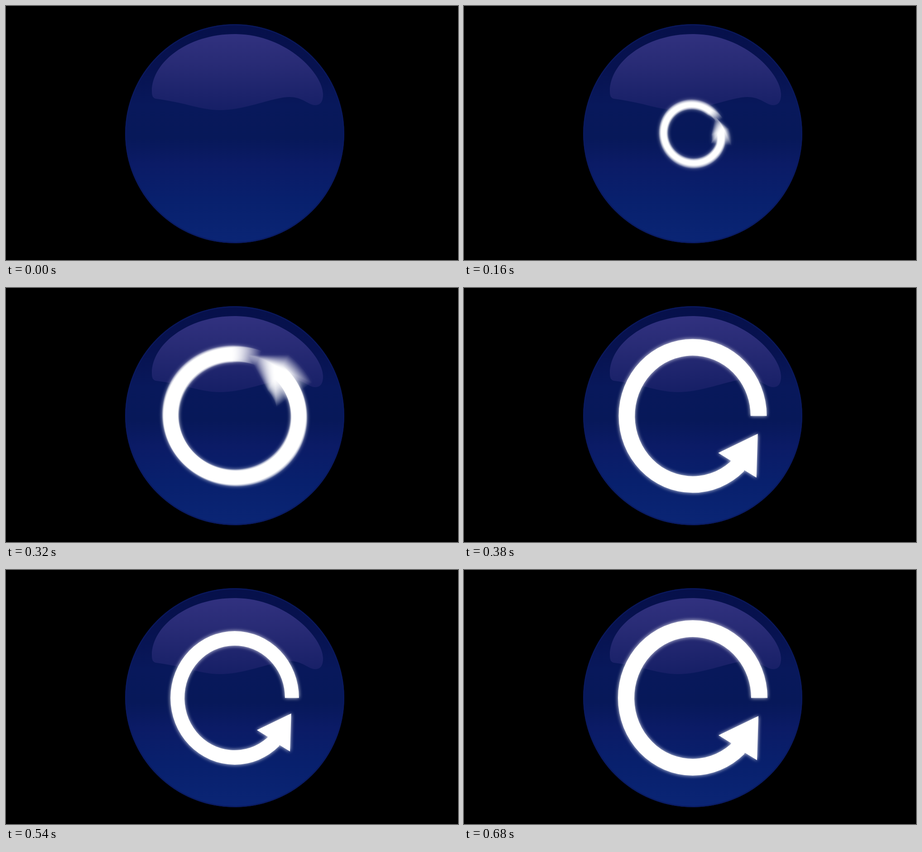
Write an HTML page with a canvas that moves like this. It is 998 px wide and 561 px high and loops after 1200 ms.

```html
<!DOCTYPE html>
<html lang="en">
<head>
<meta charset="utf-8">
<title>Refresh button</title>
<style>
  html, body { margin: 0; width: 100%; height: 100%; overflow: hidden; background: #000; }
  svg, canvas { position: absolute; left: 0; top: 0; width: 998px; height: 561px; display: block; }
</style>
</head>
<body>
<svg viewBox="0 0 998 561">
  <defs>
    <linearGradient id="ball" x1="0" y1="40" x2="0" y2="524" gradientUnits="userSpaceOnUse">
      <stop offset="0" stop-color="#06104a"/>
      <stop offset=".2" stop-color="#071250"/>
      <stop offset=".37" stop-color="#08185b"/>
      <stop offset=".52" stop-color="#071859"/>
      <stop offset=".64" stop-color="#0b1b66"/>
      <stop offset=".8" stop-color="#08206d"/>
      <stop offset="1" stop-color="#0a2575"/>
    </linearGradient>
    <linearGradient id="gloss" x1="0" y1="62" x2="0" y2="230" gradientUnits="userSpaceOnUse">
      <stop offset="0" stop-color="#31317f"/>
      <stop offset=".4" stop-color="#282b75"/>
      <stop offset="1" stop-color="#161f66"/>
    </linearGradient>
  </defs>
  <circle cx="505" cy="282" r="242" fill="url(#ball)"/>
  <circle cx="505" cy="282" r="240.5" fill="none" stroke="#0a1a60" stroke-width="2.5" stroke-opacity=".8"/>
  <path fill="url(#gloss)" d="M322 188C322 125 400 62 505 62C620 62 700 150 700 195
    C700 212 694 219 682 219C668 219 655 201 626 201C590 201 530 230 472 230
    C430 230 400 214 332 205C324 204 322 198 322 188Z"/>
</svg>
<canvas id="stage" width="998" height="561"></canvas>
<script>
const LOOP = 1200, STEP = 20, SPIN_END = 360, TURNS = 2;
const SHUTTER = 12.5, SAMPLES = 51;
const CX = 505, CY = 282.5;
const SCALE_KEYS = [[0, 0], [360, 1], [560, .85], [680, 1]];

const ctx = document.getElementById('stage').getContext('2d');
const layer = document.createElement('canvas');
layer.width = 998;
layer.height = 561;
const pen = layer.getContext('2d');

const clamp = (v, lo, hi) => Math.min(hi, Math.max(lo, v));
const ease = u => (u + u * u * (3 - 2 * u)) / 2;

function scaleAt(t) {
  for (let i = 1; i < SCALE_KEYS.length; i++) {
    const [t0, a] = SCALE_KEYS[i - 1], [t1, b] = SCALE_KEYS[i];
    if (t <= t1) return a + (b - a) * ease(clamp((t - t0) / (t1 - t0), 0, 1));
  }
  return 1;
}

const angleAt = t => TURNS * 2 * Math.PI * (clamp(t / SPIN_END, 0, 1) - 1);

function buildArrow() {
  const p = new Path2D();
  const end = Math.atan2(121, 115), inner = Math.atan2(100, 85);
  p.ellipse(0, 0, 165, 171.5, 0, 0, end, true);
  for (const [x, y] of [[115, 121], [142, 137.5], [145, 40], [57, 82.5], [85, 100]]) p.lineTo(x, y);
  p.ellipse(0, 0, 129, 134.5, 0, inner, 0, false);
  p.closePath();
  return p;
}
const arrow = buildArrow();

function stamp(t, alpha) {
  const s = scaleAt(t);
  pen.save();
  pen.translate(CX, CY);
  pen.rotate(angleAt(t));
  pen.scale(s, s);
  pen.globalAlpha = alpha;
  pen.fill(arrow);
  pen.restore();
}

function draw(t) {
  ctx.clearRect(0, 0, 998, 561);
  if (t <= 0) return;
  pen.clearRect(0, 0, 998, 561);
  pen.fillStyle = '#fff';
  if (t < SPIN_END) {
    // motion blur: many faint copies across the shutter time
    pen.globalCompositeOperation = 'lighter';
    for (let i = 0; i < SAMPLES; i++) {
      stamp(t + SHUTTER * (i / (SAMPLES - 1) - .5), 1 / SAMPLES);
    }
  } else {
    pen.globalCompositeOperation = 'source-over';
    stamp(t, 1);
  }
  ctx.shadowColor = 'rgba(255,255,255,.9)';
  ctx.shadowBlur = 9;
  ctx.drawImage(layer, 0, 0);
}

const start = performance.now();
let last = -1;
function tick() {
  const now = Math.max(0, performance.now() - start) % LOOP;
  const t = Math.min(680, Math.floor(now / STEP) * STEP);
  if (t !== last) draw(last = t);
  requestAnimationFrame(tick);
}
tick();
</script>
</body>
</html>
```
